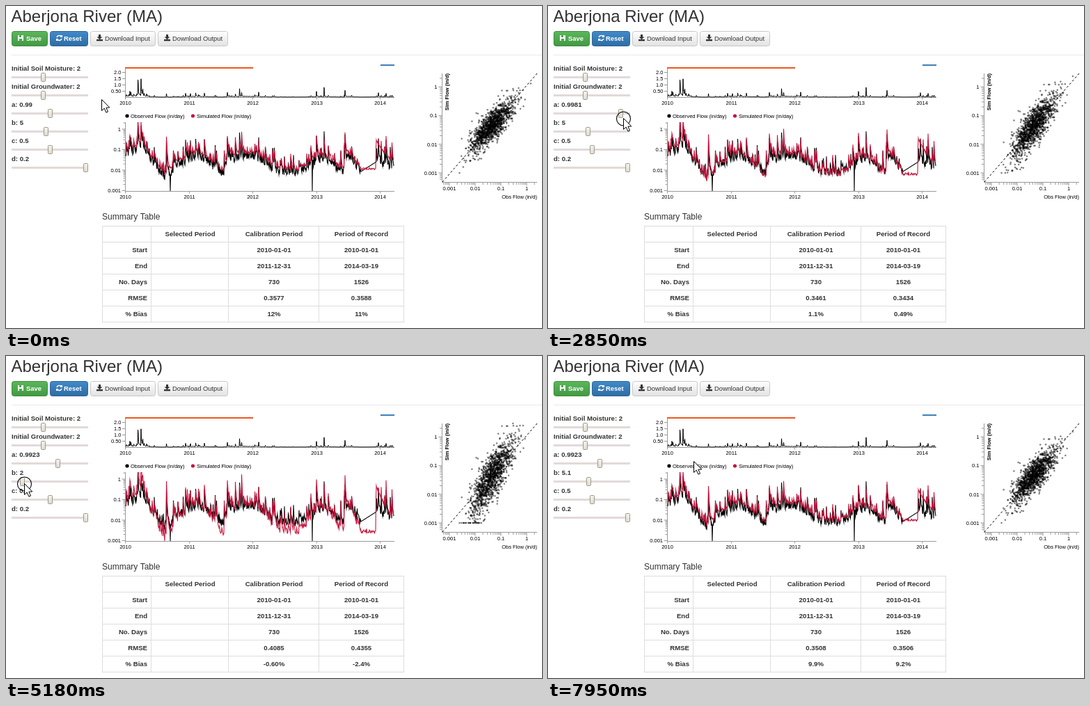
Recreate the animation shown at these times as an HTML page with a canvas. Size 770 by 463 pixels, loop 8000 ms.

```html
<!DOCTYPE html>
<html lang="en">
<head>
<meta charset="utf-8">
<title>Streamflow model</title>
<style>
html, body { margin: 0; width: 100%; height: 100%; overflow: hidden; background: #fff; }
canvas { display: block; }
</style>
</head>
<body>
<canvas id="stage" width="770" height="463"></canvas>
<script>
const ctx = document.getElementById('stage').getContext('2d');
const FONT = '"Liberation Sans", Arial, sans-serif';
const LOOP = 8000;

// Bursts of redraws: start, end, number of steps
const BURSTS = [[270, 1210, 8], [1360, 2300, 8], [2420, 3390, 8], [3540, 4080, 5],
  [4370, 5310, 8], [5460, 6420, 8], [6540, 6540, 1], [6950, 6950, 1], [7230, 7950, 6]];

// Turning points of the pointer and the two dragged parameters
const POINTER = [[135, 137, 134], [1210, 61, 156], [1900, 29, 161], [2300, 77, 160], [2830, 108, 161],
  [3390, 82, 161], [4235, 75, 161], [4505, 57, 182], [4635, 44, 183], [5170, 26, 183],
  [5310, 26, 184], [6140, 70, 185], [6280, 64, 185], [6540, 60, 186], [7095, 60, 186], [7950, 209, 151]];
const PARAM_A = [[1210, .99], [1900, .9832], [2300, .9872], [2690, .9974], [2960, .9987],
  [3390, .9953], [3945, .9923]];
const PARAM_B = [[4505, 5], [4635, 4.8], [5170, 2], [5460, 2], [6140, 6.2], [6280, 5.9], [6540, 5.1]];

// Parameter, RMSE (calibration, record), bias (calibration, record)
const FIT_A = [[.9872, .3671, .3692, 14, 13], [.99, .3577, .3588, 12, 11],
  [.9923, .3507, .3507, 9.8, 9], [.9953, .3483, .3469, 5.3, 4.6]];
const FIT_B = [[2, .4085, .4355, -.6, -2.4], [4.8, .3501, .3508, 9.3, 8.5],
  [5.1, .3508, .3506, 9.9, 9.2], [5.9, .3552, .3533, 11, 11]];

// Seasonal low flow and the main storms, as chart positions
const BASE = [[172, 214], [196, 204], [228, 248], [250, 227], [275, 214], [312, 241], [322, 220],
  [355, 215], [390, 238], [420, 240], [455, 218], [484, 239], [492, 217], [510, 238], [532, 224], [557, 232]];
const STORMS = [[178, 189], [189.5, 167], [194, 170.5], [230.5, 191], [318, 190], [446, 189], [487, 187]];

function along(rows, k, open = false) {
  const i = Math.max(1, rows.findIndex(r => r[0] >= k));
  const end = k > rows[rows.length - 1][0] ? rows.length - 1 : i;
  const p = rows[end - 1], q = rows[end];
  let u = (k - p[0]) / (q[0] - p[0]);
  if (!open) u = Math.min(1, Math.max(0, u));
  return p.map((v, j) => v + (q[j] - v) * u);
}

function randomizer(seed) {
  return () => {
    seed = seed + 0x6D2B79F5 | 0;
    let z = Math.imul(seed ^ seed >>> 15, 1 | seed);
    z = z + Math.imul(z ^ z >>> 7, 61 | z) ^ z;
    return ((z ^ z >>> 14) >>> 0) / 4294967296;
  };
}
const rnd = randomizer(11);
const gauss = () => Math.sqrt(-2 * Math.log(1 - rnd())) * Math.cos(2 * Math.PI * rnd());

function makeSeries() {
  const low = x => along(BASE, x)[1];
  const dry = x => x > 509 && x < 532;
  const events = STORMS.map(([x, y]) => ({ x, h: low(x) - y, s: low(x) - y, tau: 1.3 }));
  events.push({ x: 531.5, h: 0, s: 29, tau: 9 });
  for (let x = 173; x < 556; x += 1.5 + rnd() * 3) {
    if (dry(x)) continue;
    const h = Math.min(low(x) - 190, 5 + 32 * rnd() ** 1.6);
    events.push({ x, h, s: h * (.6 + rnd() * .5), tau: .5 + rnd() });
  }
  const obs = [], sim = [];
  for (let x = 172; x <= 557; x += .5) {
    let up = 0, upSim = 0;
    for (const e of events) {
      const d = x - e.x;
      if (d < -.25 || d > 26) continue;
      up = Math.max(up, e.h * Math.exp(-d / e.tau));
      upSim = Math.max(upSim, e.s * Math.exp(-d / (e.tau * 1.6)));
    }
    const failed = x === 236 || x === 440;
    obs.push([x, failed ? 266 : low(x) - up + (dry(x) ? 0 : (rnd() - .45) * 11)]);
    sim.push([x, (dry(x) ? 234 : low(x) - 4) - upSim + (rnd() - .5) * 3]);
  }
  return { obs, sim };
}
const { obs, sim } = makeSeries();

// Pairs of log10 flow, relative to the mean
const MEAN = -1.37;
const pairs = Array.from({ length: 1400 }, () => {
  const u = gauss() * .42;
  return [u, u * .82 + gauss() * .26];
});

function text(s, x, y, size, { bold = false, align = 'left', color = '#333' } = {}) {
  ctx.font = `${bold ? 'bold ' : ''}${size}px ${FONT}`;
  ctx.textAlign = align;
  ctx.textBaseline = 'alphabetic';
  ctx.fillStyle = color;
  ctx.fillText(s, x, y);
}

function line(pts, color, width = 1) {
  ctx.beginPath();
  pts.forEach(([x, y]) => ctx.lineTo(x, y));
  ctx.strokeStyle = color;
  ctx.lineWidth = width;
  ctx.stroke();
}

function box(x, y, w, h, top, bottom, border, r) {
  const g = ctx.createLinearGradient(0, y, 0, y + h);
  g.addColorStop(0, top);
  g.addColorStop(1, bottom);
  ctx.beginPath();
  ctx.roundRect(x + .5, y + .5, w - 1, h - 1, r);
  ctx.fillStyle = g;
  ctx.fill();
  ctx.strokeStyle = border;
  ctx.lineWidth = 1;
  ctx.stroke();
}

function dot(x, y, r, color) {
  ctx.beginPath();
  ctx.arc(x, y, r, 0, 7);
  ctx.fillStyle = color;
  ctx.fill();
}

function downloadIcon(x) {
  ctx.fillStyle = '#333';
  ctx.fillRect(x + 3, 41, 3, 4);
  ctx.beginPath();
  ctx.moveTo(x + .7, 44.5);
  ctx.lineTo(x + 8.3, 44.5);
  ctx.lineTo(x + 4.5, 48.3);
  ctx.fill();
  ctx.fillRect(x, 48, 9, 2.3);
}

function saveIcon() {
  ctx.fillStyle = '#fff';
  ctx.fillRect(17, 42, 8, 8);
  ctx.fillStyle = '#4fa84f';
  ctx.fillRect(19, 42, 3, 3);
  ctx.fillRect(19, 47, 4, 3);
}

function resetIcon() {
  for (const a of [.25, Math.PI + .25]) {
    ctx.beginPath();
    ctx.arc(76.5, 46, 3.5, a, a + 2.4);
    ctx.strokeStyle = '#fff';
    ctx.lineWidth = 1.5;
    ctx.stroke();
  }
  ctx.fillStyle = '#fff';
  ctx.fillRect(78, 42, 3, 3);
  ctx.fillRect(72, 47, 3, 3);
}

function header() {
  text('Aberjona River (MA)', 7.5, 23, 24);
  box(8, 36, 52, 22, '#5cb85c', '#429842', '#3e8f3e', 3);
  box(63, 36, 55, 22, '#428bca', '#2d6ca2', '#2b669a', 3);
  box(121, 36, 94, 22, '#ffffff', '#e2e2e2', '#c8c8c8', 3);
  box(218, 36, 101, 22, '#ffffff', '#e2e2e2', '#c8c8c8', 3);
  saveIcon();
  resetIcon();
  downloadIcon(130);
  downloadIcon(227);
  text('Save', 29, 50, 9.4, { bold: true, color: '#fff' });
  text('Reset', 83, 50, 9.4, { bold: true, color: '#fff' });
  text('Download Input', 142, 50, 9.33);
  text('Download Output', 239, 50, 9.33);
  line([[8, 70.5], [770, 70.5]], '#e9e9e9');
}

function sliders(a, b) {
  const rows = [['Initial Soil Moisture: 2', 53], ['Initial Groundwater: 2', 53],
    ['a: ' + +a.toFixed(4), 63.2 + (a - .99) / .0001976], ['b: ' + +b.toFixed(1), 57 + (b - 5) * 11.3],
    ['c: 0.5', 63], ['d: 0.2', 114]];
  rows.forEach(([label, x], i) => {
    const y = 103 + i * 26;
    text(label, 8, y - 10, 9.6, { bold: true });
    ctx.fillStyle = '#e3d9d9';
    ctx.fillRect(8, y - 2, 110, 3);
    box(Math.floor(x) - 3, y - 7, 7, 13, '#f6f4ec', '#dedbd0', '#9d998d', 1);
  });
}

const axisText = (s, x, y, align) => text(s, x, y + 2.7, 7.5, { align, color: '#000' });
const AXIS = '#999';

function yearAxis(y, labelY) {
  line([[171, y], [558, y]], AXIS);
  for (let i = 0; i < 5; i++) {
    const x = 171.5 + Math.round(i * 91.6);
    line([[x, y], [x, y + 3]], AXIS);
    axisText(String(2010 + i), x, labelY, 'center');
  }
}

function logTicks(from, to, draw) {
  for (let e = -4; e < 1; e++) {
    for (let m = 1; m < 10; m++) {
      const v = e + Math.log10(m);
      if (v >= from && v <= to) draw(v, m === 1);
    }
  }
}
const power = v => String(+(10 ** v).toFixed(3));

function overview() {
  line([[171, 89], [355, 89]], '#f0561d', 2);
  line([[538, 85], [558, 85]], '#3f7fb8', 2);
  line([[171.5, 90], [171.5, 132]], AXIS);
  ['0.50', '1.0', '1.5', '2.0'].forEach((s, i) => {
    const y = 122.5 - i * 9;
    line([[167, y], [171, y]], AXIS);
    axisText(s, 165.5, y, 'right');
  });
  yearAxis(131.5, 139);
  line(obs.map(([x, y]) => [x, 131 - 18 * 10 ** ((177 - y) / 29.5)]), '#000');
}

function hydrograph(stretch) {
  dot(174, 158, 2.6, '#000');
  axisText('Observed Flow (in/day)', 179, 158, 'left');
  dot(268.5, 158, 2.6, '#c8143c');
  axisText('Simulated Flow (in/day)', 274, 158, 'left');
  line([[171.5, 167], [171.5, 266]], AXIS);
  logTicks(-3, .35, (v, major) => {
    const y = 177 - v * 29.5;
    line([[major ? 166.5 : 168.5, y], [171, y]], AXIS);
    if (major) axisText(power(v), 165, y, 'right');
  });
  yearAxis(266.5, 274);
  ctx.save();
  ctx.beginPath();
  ctx.rect(171, 167, 388, 99);
  ctx.clip();
  line(obs, '#000', 1.1);
  line(sim.map(([x, y]) => [x, 207 - stretch(207 - y)]), '#c8143c', 1.1);
  ctx.restore();
}

function scatter(stretch) {
  const px = v => 748 + v * 37, py = v => 116.4 - v * 41.2;
  line([[626.5, 97], [626.5, 253.5], [763, 253.5]], AXIS);
  logTicks(-3.3, .43, (v, major) => {
    line([[major ? 621.5 : 623, py(v)], [626, py(v)]], AXIS);
    if (major) axisText(power(v), 619.5, py(v), 'right');
  });
  logTicks(-3.27, .4, (v, major) => {
    line([[px(v), 254], [px(v), major ? 258.5 : 257]], AXIS);
    if (major) axisText(power(v), px(v), 262.5, 'center');
  });
  axisText('Obs Flow (in/d)', 763, 274, 'right');
  ctx.setLineDash([3, 3]);
  line([[627, 253], [763, 97]], '#000');
  ctx.setLineDash([]);
  for (const [u, v] of pairs) {
    const x = px(MEAN + u), y = py(Math.max(-3, MEAN + stretch(v)));
    if (x > 625 && x < 765 && y > 96) dot(x, y, 1.25, 'rgba(0,0,0,.5)');
  }
  ctx.save();
  ctx.translate(633, 97);
  ctx.rotate(-Math.PI / 2);
  text('Sim Flow (in/d)', 0, 2.7, 7.5, { bold: true, align: 'right', color: '#000' });
  ctx.restore();
}

function table(a, b) {
  const [, rc, rp, bc, bp] = b === 5 ? along(FIT_A, a, true) : along(FIT_B, b, true);
  const pct = v => v.toPrecision(2) + '%';
  const rows = [['', 'Calibration Period', 'Period of Record'], ['Start', '2010-01-01', '2010-01-01'],
    ['End', '2011-12-31', '2014-03-19'], ['No. Days', '730', '1526'],
    ['RMSE', rc.toFixed(4), rp.toFixed(4)], ['% Bias', pct(bc), pct(bp)]];
  text('Summary Table', 138, 307, 12);
  for (let i = 0; i < 7; i++) line([[138, 316.5 + i * 23], [572, 316.5 + i * 23]], '#ddd');
  for (const x of [138.5, 208.5, 319.5, 449.5, 571.5]) line([[x, 316], [x, 455]], '#ddd');
  const cell = (s, x, y, align = 'center') => text(s, x, y, 9.6, { bold: true, align });
  cell('Selected Period', 264.5, 331);
  rows.forEach(([name, cal, rec], i) => {
    const y = 331 + i * 23;
    cell(name, 203, y, 'right');
    cell(cal, 385, y);
    cell(rec, 510.5, y);
  });
}

function pointer(x, y, pressed) {
  if (pressed) {
    ctx.beginPath();
    ctx.arc(x + .5, y + 1, 10, 0, 7);
    ctx.strokeStyle = '#000';
    ctx.lineWidth = 1.1;
    ctx.stroke();
  }
  ctx.beginPath();
  [[0, 0], [0, 16], [3.7, 12.6], [6.4, 18.6], [9, 17.5], [6.4, 11.7], [11.3, 11.5]]
    .forEach(([dx, dy]) => ctx.lineTo(x + dx + .5, y + dy + .5));
  ctx.closePath();
  ctx.fillStyle = '#fff';
  ctx.fill();
  ctx.strokeStyle = '#000';
  ctx.lineWidth = 1;
  ctx.stroke();
}

// Latest moment at which the screen was refreshed
function refreshTime(t) {
  let last = 0;
  for (const [start, end, n] of BURSTS) {
    if (t < start) break;
    const gap = (end - start) / (n - 1) || 1;
    last = start + Math.min(n - 1, Math.floor((t - start) / gap + 1e-6)) * gap;
  }
  return last;
}

function draw(t) {
  const a = along(PARAM_A, t)[1], b = along(PARAM_B, t)[1];
  const gain = 1 + (a - .99) * 35 + (5 - b) * (b < 5 ? .2 : .09);
  const stretch = v => v * (v < 0 ? gain : 1 + (gain - 1) * .6);
  ctx.fillStyle = '#fff';
  ctx.fillRect(0, 0, 770, 463);
  header();
  sliders(a, b);
  overview();
  hydrograph(stretch);
  scatter(stretch);
  table(a, b);
  const [, x, y] = along(POINTER, t);
  pointer(Math.round(x), Math.round(y), t > 1209 && t < 4369 || t > 4500 && t < 6950);
}

const began = performance.now();
let shown = -1;
function tick() {
  const t = refreshTime((performance.now() - began) % LOOP);
  if (t !== shown) draw(shown = t);
  requestAnimationFrame(tick);
}
tick();
</script>
</body>
</html>
```
